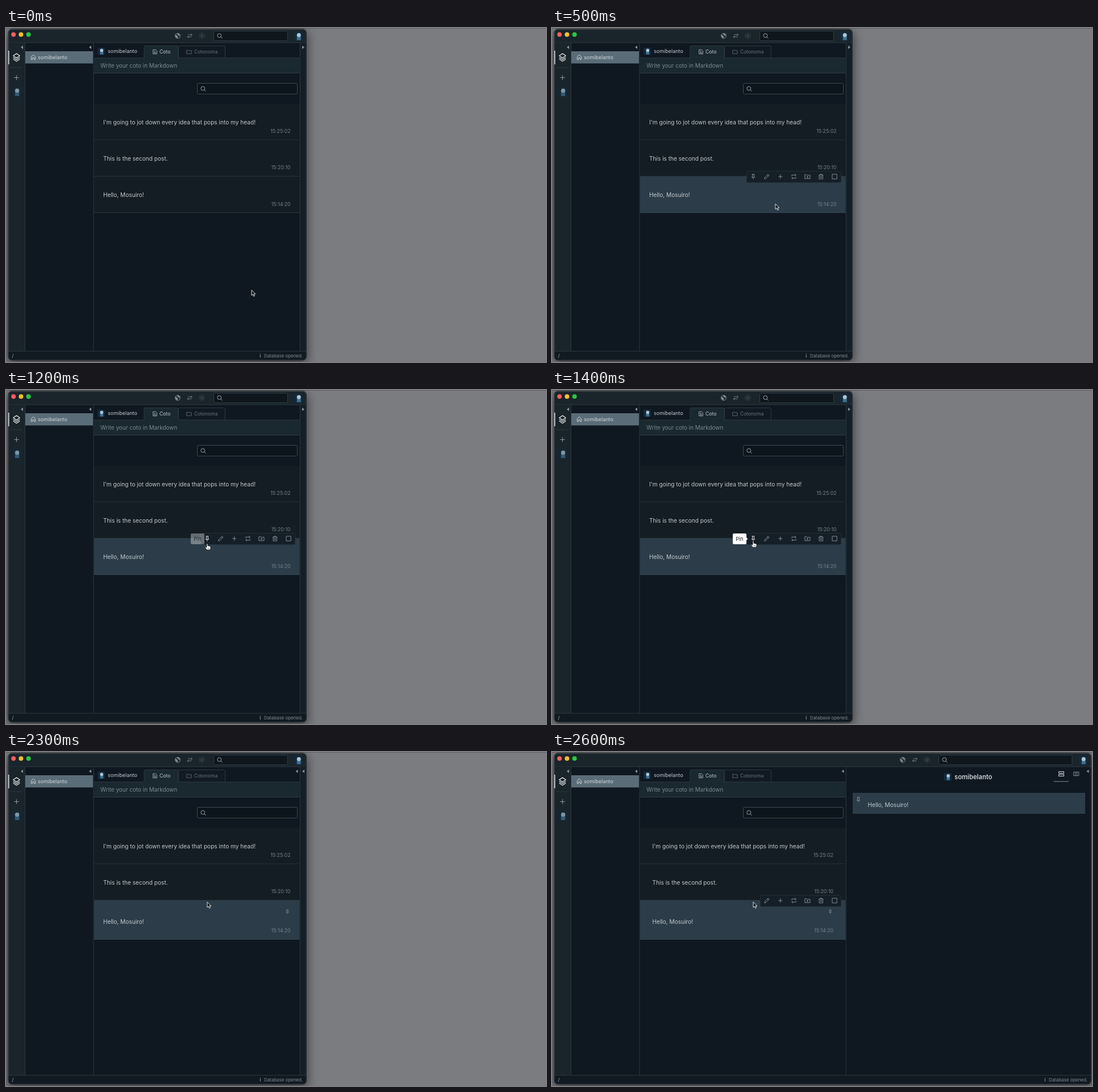
An HTML page that plays this animation: 950 px wide and 589 px high, repeating every 3.3 s.

```html
<!DOCTYPE html>
<html lang="en">
<head>
<meta charset="utf-8">
<title>Pinning a post</title>
<style>
  html, body { margin: 0; width: 100%; height: 100%; overflow: hidden; background: #7b7c80; }
  svg { display: block; width: 950px; height: 589px; font-family: Inter, "Open Sans", sans-serif; }
</style>
</head>
<body>
<svg id="stage" viewBox="0 0 950 589"></svg>
<script>
const stage = document.getElementById("stage");
const LOOP = 3300, STEP = 100;
const USER = "somibelanto";
const BAR = "#1a242b", PANE = "#0f1720", POST = "#131d23", HOVER = "#2c3d49", LINE = "#2c3941";
const TEXT = "#c3c8cd", MUTED = "#75808a", ICON = "#8b959d";

// Icons on a 24-unit grid
const ICONS = {
  globe: '<circle cx="12" cy="12" r="9"/><path fill="currentColor" stroke="none" d="M4 8l6 3 3 4-2 6-6-4zM11 3l7 2 2 5-4 3-2-4-4-2z"/>',
  swap: '<path d="M5 8h16m-4-4 4 4-4 4M19 16H3m4-4-4 4 4 4"/>',
  sun: '<circle cx="12" cy="12" r="4"/><path d="M12 1v4m0 14v4M1 12h4m14 0h4M4 4l3 3m10 10 3 3M4 20l3-3M17 7l3-3"/>',
  search: '<circle cx="10.5" cy="10.5" r="7.500"/><path d="M16 16l6 6"/>',
  layers: '<path d="M12 2l9 6-9 6-9-6zM3 12.5l9 6 9-6M3 17l9 6 9-6"/>',
  plus: '<path d="M12 4v16M4 12h16"/>',
  home: '<path d="M4 10l8-7 8 7v11h-5v-7H9v7H4z"/>',
  doc: '<path d="M4 3h11l5 5v13H4zM8 9h4M8 13h8M8 17h8"/>',
  folder: '<path d="M2 5h7l2 2h11v13H2z"/>',
  folderPlus: '<path d="M2 5h7l2 2h11v13H2zM12 10v7M8.500 13.500h7"/>',
  pin: '<path d="M7 3h10M9 3v9l-3 3h12l-3-3V3M12 15v7"/>',
  pencil: '<path d="M3 21l1-5L17 3l4 4L8 20zM14 6l4 4"/>',
  repeat: '<path d="M4 11V6h16m-4-4 4 4-4 4M20 13v5H4m4-4-4 4 4 4"/>',
  trash: '<path d="M3 6h18M9 6V3h6v3M5 6v15h14V6M10 10v7M14 10v7"/>',
  square: '<path d="M3 3h18v18H3z"/>',
  rows: '<path d="M3 4h18v6H3zM3 14h18v6H3z"/>',
  columns: '<path d="M2 5h20v14H2zM9 5v14M15 5v14"/>'
};

const rect = (x, y, w, h, fill, more = "") =>
  `<rect x="${x}" y="${y}" width="${w}" height="${h}" fill="${fill}" ${more}/>`;
const box = (x, y, w, h, fill, line, r = 2) =>
  rect(x + .5, y + .5, w - 1, h - 1, fill, `stroke="${line}" rx="${r}"`);
const text = (x, y, str, size, fill, more = "") =>
  `<text x="${x}" y="${y}" font-size="${size}" fill="${fill}" ${more}>${str}</text>`;
const icon = (name, x, y, size, color = ICON, width = 2) =>
  `<g transform="translate(${x - size / 2} ${y - size / 2}) scale(${size / 24})" color="${color}"
    stroke="${color}" stroke-width="${width}" fill="none" stroke-linejoin="round">${ICONS[name]}</g>`;
const arrow = (x, dir) =>
  `<path d="M${x - 2 * dir} 31v6l${4 * dir}-3z" fill="#87929a"/>`;
const avatar = (x, y, size, alpha = 1) =>
  `<g transform="translate(${x} ${y}) scale(${size / 16})" opacity="${alpha}">
    ${rect(0, 0, 16, 16, "#14293a")}
    <path d="M5.500 15V9q3.500-3 7 0v6z" fill="#41708f"/><circle cx="9" cy="6" r="3.500" fill="#adc6d4"/></g>`;

// Pointer position at each 100 ms step; it rests on the last point
const PATH = [[432, 462], [430, 454], [421, 420], [409, 374], [398, 331], [393, 310], [392.5, 305],
  [391, 303.5], [383, 296], [371, 286], [361, 278], [355.5, 273.5], [354, 270.5],
  [354, 268], [354, 266], [354, 265], [354, 264.5]];

function pointer(step, hand) {
  const [x, y] = PATH[Math.min(step, PATH.length - 1)];
  const shape = hand
    ? '<path d="M-1 1Q0-.5 1 1V4.500Q2 3.700 3 4.800 4 4.300 4.800 5.400 6 5.200 6 6.500V8.500L5 11.500H-.5L-4 7Q-3.500 5.600-1 7.300z" fill="#fff" stroke="#111" stroke-width=".8"/><path d="M1.200 7.500V10M3.200 7.500V10" stroke="#111" stroke-width=".6"/>'
    : '<path d="M0 0V9.500L2.200 7.600 3.800 11.200 5.500 10.400 3.900 7H6.800z" fill="#10151a" stroke="#f2f4f5" stroke-width=".9"/>';
  return `<g transform="translate(${x} ${y})">${shape}</g>`;
}

function post(index, str, time, { shift, drop = 0, hover, pinned }) {
  const y = 133.5 + index * 64.2, h = pinned ? 69 : 64.2;
  return rect(155, y, 361.5, h, hover ? HOVER : POST)
    + rect(155, y + h - 1, 361.5, 1, hover ? "#344651" : LINE)
    + text(171 + shift, y + 36.1 + drop, str, 10.12, TEXT)
    + text(500.5 - shift, y + 51.6 + drop, time, 8.75, MUTED, 'text-anchor="end"')
    + (pinned ? icon("pin", 495 - shift, y + 19.7, 9) : "");
}

function toolbar(wide, pinHover) {
  const left = wide ? 366 : 342;
  const names = ["pin", "pencil", "plus", "repeat", "folderPlus", "trash", "square"];
  return box(left, 252, 509 - left, 21, "#151f27", "#222e37")
    + names.map((name, i) => wide && !i ? "" :
        icon(name, 354 + i * 23.85, 262, 11, !i && pinHover ? "#f4f6f7" : ICON)).join("");
}

function tooltip(progress) {
  const x = 318 + 10.8 * (1 - progress);
  return `<g opacity="${progress}">${rect(x, 253, 24, 19, "#fff", 'rx="2"')}
    ${text(x + 5.2, 266, "Pin", 9.2, "#1b2630")}</g>`
    + (progress === 1 ? '<path d="M342 260l2.500 2.500-2.500 2.500z" fill="#fff"/>' : "");
}

function frameBackground(right) {
  const w = right - 4;
  return rect(0, 0, 950, 589, "#7b7c80")
    + `<defs><filter id="blur" x="-20%" y="-20%" width="140%" height="140%"><feGaussianBlur stdDeviation="9"/></filter>
       <clipPath id="window">${rect(4, 2, w, 584, "#000", 'rx="6.600"')}</clipPath></defs>`
    + rect(2, 6, w + 4, 586, "#000", 'rx="8" opacity=".5" filter="url(#blur)"')
    + rect(0, 0, 950, 1, "#000", 'opacity=".22"')
    + rect(4, 2, w, 584, PANE, 'rx="6.600" stroke="#080b0e" stroke-width=".8"');
}

// Thin light line that the system draws just inside a dark window
const rim = right =>
  rect(4.4, 2.4, right - 4.8, 583.2, "none", 'rx="6.200" stroke="#fff" stroke-opacity=".18" stroke-width=".8"');

function titleBar(right, wide) {
  const dx = wide ? 315 : 0;
  const lights = ["#ff5f57", "#febc2e", "#28c840"];
  return rect(4, 2, right - 4, 24, BAR) + rect(4, 25.5, right - 4, 1, LINE)
    + lights.map((c, i) => `<circle cx="${13.2 + i * 13.2}" cy="11.500" r="3.960" fill="${c}"/>`).join("")
    + icon("globe", 302 + dx, 13.8, 12, "#7e8991") + icon("swap", 323.3 + dx, 13.8, 11, "#7e8991")
    + icon("sun", 344.5 + dx, 13.8, 12, "#4d5a63")
    + box(365 + dx, 5, wide ? 235.5 : 131, 18, "#0f171d", "#303c45")
    + icon("search", 376 + dx, 14, 11, "#a5aeb5")
    + avatar(right - 22.3, 6.5, 16);
}

function sidebar() {
  return rect(4, 26, 29, 544, BAR) + rect(33, 26, 1, 544, LINE) + rect(153.5, 26, 1, 544, LINE)
    + rect(4, 40, 1.5, 24, "#e6eaec") + icon("layers", 18.5, 51.6, 15.5, "#e2e6e9")
    + rect(8, 69.5, 20, 1, LINE) + icon("plus", 18.5, 87.5, 13)
    + avatar(10, 104, 17, .7) + arrow(28, -1) + arrow(148, -1)
    + rect(34, 41, 119, 21.5, "#5a6c78")
    + icon("home", 48, 51.5, 11, "#d0d6da") + text(56, 55, USER, 9, "#d0d6da");
}

function editor() {
  return avatar(161, 34.5, 13) + text(179, 44.3, USER, 9, TEXT)
    + box(303, 31, 83, 23, "#111a22", LINE)
    + rect(154.5, 52.5, 362, 27.5, "#1a2830") + rect(154.5, 52.5, 362, 1, LINE)
    + rect(154.5, 79, 362, 1, "#303d46")
    + box(242.5, 31, 61, 24, "#1a2830", LINE) + rect(243.5, 52.5, 59, 3, "#1a2830")
    + icon("doc", 262, 42, 10, "#b5bdc3") + text(270, 45.2, "Coto", 8.7, TEXT)
    + icon("folder", 322, 42, 10, "#65717a") + text(331, 45.2, "Cotonoma", 8.5, "#65717a")
    + text(166, 69.5, "Write your coto in Markdown", 9.95, "#7d8891")
    + box(336, 97, 177, 20, "#0d151c", "#3c4851")
    + icon("search", 347, 107.3, 11, "#a5aeb5");
}

function pinnedPane() {
  return avatar(689.5, 37, 13.5) + text(708, 47.5, USER, 11.2, "#ccd1d5", 'font-weight="600"')
    + icon("rows", 896, 38.5, 12, "#d7dce0") + rect(882.5, 51.5, 26.5, 1, "#84909a")
    + icon("columns", 922.3, 38.5, 11) + arrow(942.5, -1)
    + rect(529, 72, 409, 37, HOVER) + icon("pin", 539, 84, 11)
    + text(555.5, 97.2, "Hello, Mosuiro!", 10.12, TEXT);
}

function statusBar(right) {
  return rect(4, 570, right - 4, 16, "#111a21") + rect(4, 569.5, right - 4, 1, LINE)
    + text(10.5, 581, "/", 8.5, "#a0a9b0")
    + text(right - 6.5, 580.6, "Database opened.", 7.9, "#7f8a93", 'text-anchor="end"')
    + text(right - 82.3, 580.8, "i", 8.5, "#9aa4ab", 'font-weight="500"');
}

function draw(step) {
  const pinned = step >= 23, wide = step >= 24;
  const hover = step >= 5, pinHover = step >= 12 && !pinned;
  const right = wide ? 948.5 : 528.5;
  const shift = wide ? 5.5 : 0;
  return frameBackground(right)
    + '<g clip-path="url(#window)">'
    + titleBar(right, wide) + sidebar() + editor()
    + post(0, "I'm going to jot down every idea that pops into my head!", "15:25:02", { shift })
    + post(1, "This is the second post.", "15:20:10", { shift })
    + post(2, "Hello, Mosuiro!", "15:14:20", { shift, drop: pinned ? 4.7 : 0, hover, pinned })
    + (wide ? "" : rect(517, 26, 12, 544, "#141e26") + arrow(523, pinned ? -1 : 1))
    + rect(516.8, 26, 1, 544, LINE)
    + (pinned ? arrow(511.5, -1) : "") + (wide ? pinnedPane() : "")
    + statusBar(right) + "</g>" + rim(right)
    + (hover && (!pinned || wide) ? toolbar(wide, pinHover) : "")
    + (pinHover ? tooltip([.35, .92][step - 12] || 1) : "")
    + pointer(step, pinHover);
}

let shown = -1;
function tick() {
  const step = Math.floor(performance.now() % LOOP / STEP);
  if (step !== shown) stage.innerHTML = draw(shown = step);
  requestAnimationFrame(tick);
}
tick();
</script>
</body>
</html>
```
